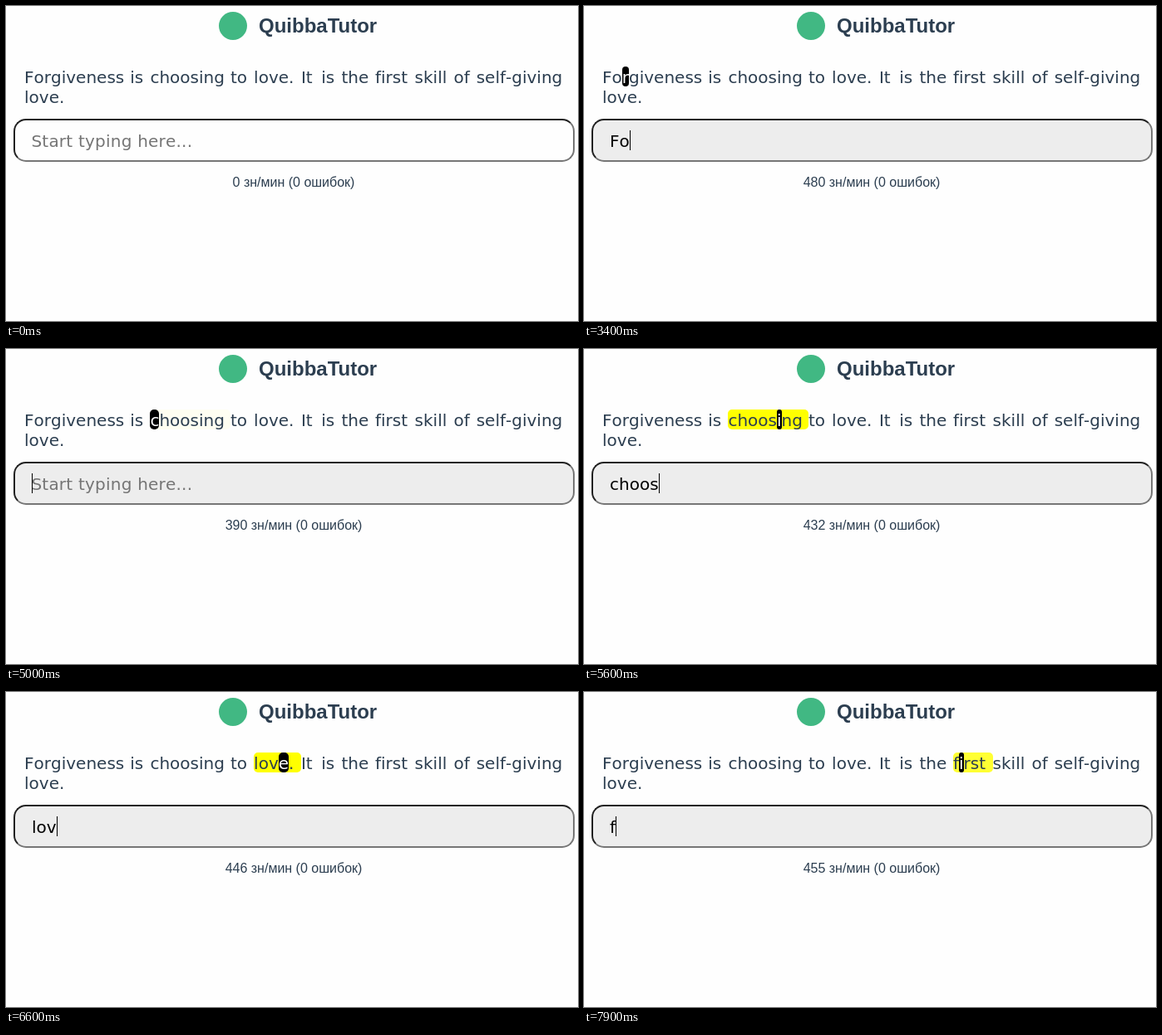
Write an HTML page that moves like this. It is 688x380 px and loops after 8000 ms.

```html
<!DOCTYPE html>
<html lang="en">
<head>
<meta charset="utf-8">
<style>
  html, body { margin: 0; width: 100%; height: 100%; overflow: hidden; background: #fefefe; }
  body { position: relative; color: #2c3e50; font: 20px "DejaVu Sans", sans-serif; font-kerning: none; }
  body > * { position: absolute; white-space: pre; }
  #logo { left: 256px; top: 7px; width: 34px; height: 34px; border-radius: 50%; background: #41b883; }
  #title { left: 304px; top: 10px; font: bold 24px/28px "Liberation Sans", Arial, sans-serif; }
  .word { display: flex; height: 24px; line-height: 26px; border-radius: 5px; }
  .word span { height: 24px; border-radius: 5px; }
  .word span:last-child { flex: 1; }
  .word .now { background: #000; color: #fff; }
  #field { left: 9px; top: 136px; width: 675px; height: 52px; box-sizing: border-box;
    border: 2px inset #767676; border-radius: 15px; background: #fefefe; }
  #field.hover { background: #ededed; }
  #entry { left: 31px; top: 151px; line-height: 24px; color: #000; }
  #caret { position: absolute; top: -1px; width: 1px; height: 24px; background: #000; }
  #hint { margin-left: -.6px; color: #757575; letter-spacing: .22px; }
  #stats { left: 0; width: 692px; top: 204px; text-align: center;
    font: 16px/18px "Liberation Sans", Arial, sans-serif; }
</style>
</head>
<body>
<div id="logo"></div>
<div id="title">QuibbaTutor</div>
<div id="field"></div>
<div id="entry"><span id="typed"></span><i id="caret"></i><span id="hint">Start typing here...</span></div>
<div id="stats"></div>
<script>
const LOOP = 8000, START = 3200;
const text = 'Forgiveness is choosing to love. It is the first skill of self-giving love.';
const lefts = [22, 149.3, 173.4, 269.9, 298.1, 354.9, 379.3, 403.4, 444, 491.6, 538.4, 565.7];
// Typing rhythm: [time in ms, characters typed]
const rhythm = [[3200, 1], [3400, 2], [5000, 15], [6000, 24], [6100, 25], [7100, 35], [7800, 43], [7900, 44]];
const $ = id => document.getElementById(id);

function lerpAlong(x, from, to) {
  const i = Math.max(1, rhythm.findIndex(p => p[from] >= x));
  const a = rhythm[i - 1], b = rhythm[i];
  return a[to] + (x - a[from]) / (b[from] - a[from]) * (b[to] - a[to]);
}
const typedAt = t => t < START ? 0 : Math.floor(lerpAlong(t, 0, 1) + 1e-6);
const timeOf = count => lerpAlong(count, 1, 0);

let index = 0;
const words = text.match(/\S+ ?/g).map((str, i) => {
  const el = document.createElement('div');
  const wraps = i === lefts.length;
  el.className = 'word';
  el.style.left = (wraps ? 22 : lefts[i]) + 'px';
  el.style.top = (wraps ? 97 : 73) + 'px';
  if (!wraps) el.style.width = (lefts[i + 1] || 677) - lefts[i] + 'px';
  for (const ch of str) el.appendChild(document.createElement('span')).textContent = ch;
  document.body.append(el);
  const word = { el, str, first: index };
  index += str.length;
  return word;
});

function caretOn(t) {
  return t >= 700 && t < 1400 || t >= 1900 && t < 2400 || t >= 2900;
}

function draw(now) {
  const t = Math.floor(now % LOOP / 100) * 100;
  const count = typedAt(t);
  let typed = '';

  words.forEach(({ el, str, first }, i) => {
    const pos = count - first;
    const active = count > 0 && pos >= 0 && pos < str.length;
    if (active) typed = str.slice(0, pos);
    const glow = active && i ? Math.min(1, .05 + .0075 * (t - timeOf(first))) : 0;
    el.style.background = `rgba(255,255,0,${glow})`;
    [...el.children].forEach((c, k) => c.classList.toggle('now', active && k === pos));
  });

  $('typed').textContent = typed;
  $('hint').hidden = typed !== '';
  $('caret').hidden = !caretOn(t);
  $('field').classList.toggle('hover', t >= 1400);

  // Speed counts letters without spaces, on a quarter-second clock
  const letters = text.slice(0, count).replace(/ /g, '').length;
  const seconds = Math.round((t - 3050) / 250) / 4;
  const speed = count ? Math.round(letters * 60 / seconds) : 0;
  $('stats').textContent = `${speed} зн/мин (0 ошибок)`;
  requestAnimationFrame(() => draw(performance.now() - begin));
}
const begin = performance.now();
draw(0);
</script>
</body>
</html>
```
